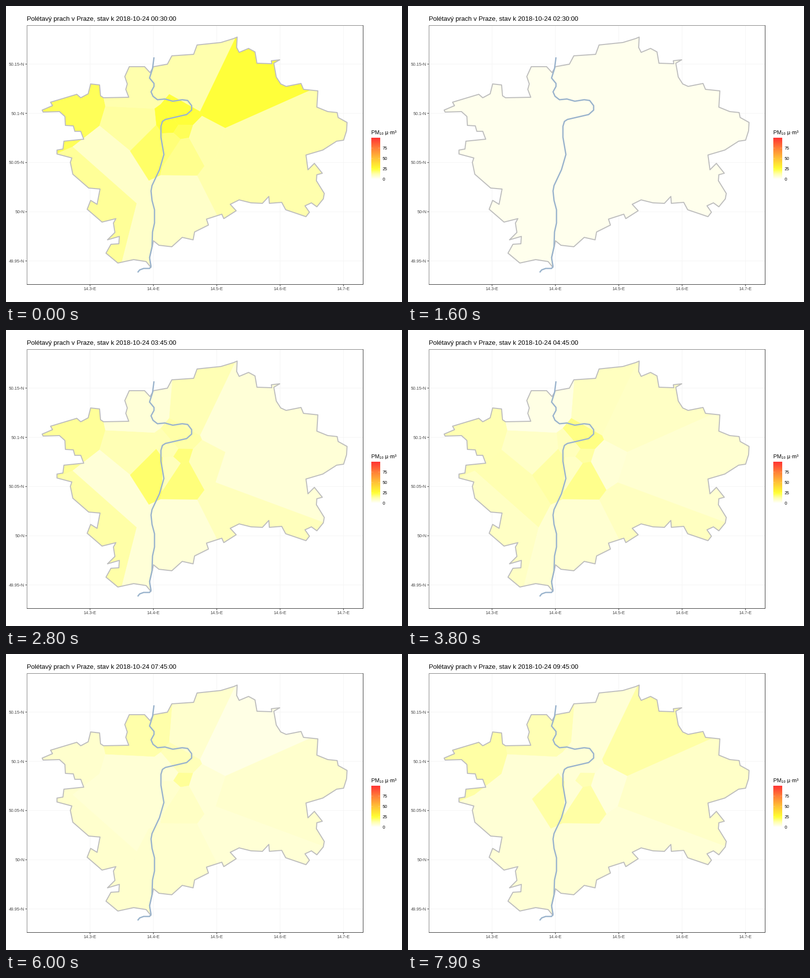
Animation, 800 px wide and 600 px high, one loop 8000 ms. Source, as a matplotlib script:

```python
import numpy as np
import matplotlib.pyplot as plt
from matplotlib.animation import FuncAnimation
from matplotlib.colors import LinearSegmentedColormap
from matplotlib.patches import Polygon

W, H, DPI = 800, 600, 100
PX = 72 / DPI
STEP = 4          # animation frames per reading
N_FRAMES = 80
LEFT, TOP, RIGHT, BOTTOM = 42.5, 39.5, 721.5, 564.5

plt.rcParams["font.family"] = ["Liberation Sans", "DejaVu Sans"]

# City limits, clockwise from the northern tip, in stage pixels
EAST = [
    (467, 63), (466, 84), (471, 94), (490, 86), (503, 93), (507, 116), (537, 117),
    (536, 111), (553, 109), (541, 116), (546, 144), (555, 158), (566, 163),
    (596, 157), (601, 169), (630, 172), (628, 205), (650, 214), (669, 216),
    (671, 226), (689, 236), (688, 253), (682, 272), (668, 274), (640, 292),
    (606, 302), (610, 332), (623, 319), (639, 339), (628, 342), (627, 354),
    (643, 380), (641, 391), (628, 407), (617, 399), (604, 405), (613, 418),
    (606, 427), (565, 413), (557, 398), (532, 400), (531, 386), (518, 400),
    (495, 399), (471, 393), (453, 402), (465, 415), (440, 431), (436, 422),
]
WEST = [
    (405, 432), (409, 444), (381, 458), (378, 474), (356, 469), (335, 488),
    (309, 485), (298, 476), (290, 512), (293, 530), (283, 518), (258, 514),
    (226, 521), (202, 501), (212, 483), (228, 482), (229, 467), (205, 474),
    (220, 459), (217, 440), (222, 431), (194, 438), (164, 412), (171, 394),
    (184, 402), (190, 371), (167, 369), (135, 341), (130, 317), (133, 308),
    (103, 300), (103, 292), (115, 290), (117, 274), (157, 270), (151, 254),
    (139, 254), (136, 243), (120, 242), (119, 224), (108, 214), (75, 215),
    (73, 211), (94, 202), (90, 195), (143, 179), (151, 186), (166, 178),
    (171, 158), (189, 160), (191, 182), (197, 186), (248, 185), (242, 169),
    (245, 158), (240, 143), (249, 123), (280, 123), (291, 135), (298, 123),
    (326, 118), (335, 101), (379, 98), (386, 79), (434, 74), (460, 66),
]
RIVER = [
    (299, 104), (296, 127), (290, 146), (299, 157), (299, 163), (293, 174),
    (297, 183), (306, 190), (321, 188.5), (337, 193), (356, 190), (367, 191.5),
    (375, 202), (375, 211), (365, 220), (322, 230), (316, 234), (313, 244),
    (313, 266), (319, 301), (310, 332), (295, 364), (293, 375), (295, 394),
    (300, 413), (300, 440), (296, 458), (295, 488), (290, 510), (293, 528),
    (290, 532), (278, 532), (270, 535), (266, 540),
]
STATIONS = dict(
    W=(115, 201.6), P=(273.6, 249), B=(211.2, 324.8), C=(182.6, 357),
    D=(356.5, 401), A=(295.8, 271.2), E=(277.8, 164.4), F=(383.6, 173),
    G=(429.5, 195), H=(473.1, 292.7), I=(450.3, 354), J=(352.5, 228),
    K=(335, 243), L=(352.2, 254), M=(357.5, 285.3), N=(336.5, 271.5),
    O=(392, 266.5),
)


def voronoi_cell(name):
    """Part of the stage that lies nearer to this station than to any other."""
    site = np.array(STATIONS[name])
    cell = [np.array(p, float) for p in ((0, 0), (W, 0), (W, H), (0, H))]
    for other in STATIONS:
        if other == name:
            continue
        rival = np.array(STATIONS[other])
        side = [(p - (site + rival) / 2) @ (rival - site) for p in cell]
        kept = []
        for i, p in enumerate(cell):
            q, sp, sq = cell[i - 1], side[i], side[i - 1]
            if sp * sq < 0:
                kept.append(q + (p - q) * sq / (sq - sp))
            if sp <= 0:
                kept.append(p)
        cell = kept
    return cell


def reading(rest, **_groups):
    """Blue channel per station: one common level, then groups that differ."""
    levels = dict.fromkeys(STATIONS, rest)
    for names, level in _groups.items():
        levels.update(dict.fromkeys(names, level))
    return np.array(list(levels.values()), float)


night = reading(173, GJK=58, WL=88, A=103, N=120, M=142, C=152, P=161, BD=201)
late = reading(195, A=57, JKL=96, W=119, MN=152, CI=161, HO=181, D=206, BG=221)
calm = reading(237)
small_hours = reading(215, A=108, LM=123, W=152, CJ=167, PFK=181, ION=188)
dawn = reading(204, J=140, BLM=176, PCA=215, E=222, O=233)
morning = reading(205, L=152, E=170, J=184, M=196, PBAIKO=213, G=229)
day = reading(213, WAGM=165, EL=180, H=200, O=219)
before_dawn = np.clip(2 * dawn - morning, 60, 240)

# Reading index -> levels; the rest is interpolated
KEYS = {0: night, 2: late, 3: late, 4: calm, 7: small_hours, 11: before_dawn,
        12: 2 * dawn - before_dawn, 13: morning, 15: morning, 18: day, 20: day}
KEY_LEVELS = np.array(list(KEYS.values())).T

fig = plt.figure(figsize=(W / DPI, H / DPI), dpi=DPI, facecolor="white")
ax = fig.add_axes([0, 0, 1, 1])
ax.set_axis_off()


def line(xs, ys, color, width, z=1, **kw):
    ax.plot(xs, ys, color=color, lw=width * PX, zorder=z, snap=False, **kw)


def label(x, y, s, size, color="black", **kw):
    return ax.text(x, y, s, fontsize=size * PX, color=color, **kw)


# Panel, grid and axes
for n in range(5):
    x = 169.8 + 128 * n
    y = 117.8 + 99.75 * n
    line([x, x], [TOP, BOTTOM], "#f5f5f5", 1, 0)
    line([LEFT, RIGHT], [y, y], "#f5f5f5", 1, 0)
    line([x, x], [BOTTOM, BOTTOM + 3], "#333333", 1)
    line([LEFT - 3, LEFT], [y, y], "#333333", 1)
    label(x, 576, f"{14.3 + n / 10:.1f}\u25e6E", 8.8, "#4d4d4d", ha="center")
    label(37.5, y + 3, f"{50.15 - n * .05:.4g}\u25e6N", 8.8, "#4d4d4d", ha="right")
line([LEFT, LEFT, RIGHT], [BOTTOM, TOP, TOP], "#808080", 1, 6)
line([LEFT, RIGHT, RIGHT], [BOTTOM, BOTTOM, TOP], "#333333", 1, 6)

# Map
outline = Polygon(EAST + WEST, closed=True, fc="none", ec="#bebebe", lw=2.1 * PX,
                  joinstyle="round", zorder=4)
ax.add_patch(outline)
cells = []
for name in STATIONS:
    cell = Polygon(voronoi_cell(name), closed=True, lw=.4, zorder=2)
    ax.add_patch(cell)
    cell.set_clip_path(outline)
    cells.append(cell)
line(*zip(*RIVER), "#9bb4cd", 2.7, 5, solid_joinstyle="round", solid_capstyle="butt")

# Legend
scale = LinearSegmentedColormap.from_list("dust", [
    (0, "#ffffff"), (.125, "#ffffab"), (.25, "#ffff33"), (.5, "#ffc236"),
    (.75, "#ff8038"), (1, "#ff3333")])
ax.imshow(np.linspace(1, 0, 256)[:, None], cmap=scale, aspect="auto",
          extent=(738, 755.5, 351, 267), interpolation="bilinear")
label(738, 260, "PM\u2081\u2080 \u00b5\u00b7m\u00b3", 11)
for value in (0, 25, 50, 75):
    y = 351 - .84 * value
    for x in (738, 752):
        line([x, x + 3.5], [y, y], "white", .5, 3, alpha=.5)
    label(761, y + 3, str(value), 8.8)

title = label(42, 30, "", 13.13)

ax.set_xlim(0, W)
ax.set_ylim(H, 0)


def draw(frame):
    k, phase = divmod(frame, STEP)
    # hold each reading, with one halfway frame before the next
    pos = k + (.5 if phase == STEP - 1 else 0)
    for cell, levels in zip(cells, KEY_LEVELS):
        cell.set_color((1, 1, np.interp(pos, list(KEYS), levels) / 255))
    minutes = 30 + 30 * k - (15 if k > 5 else 0)
    clock = f"{minutes // 60:02d}:{minutes % 60:02d}:00"
    title.set_text(f"Polétavý prach v Praze, stav k 2018-10-24 {clock}")
    return cells + [title]


anim = FuncAnimation(fig, draw, frames=N_FRAMES, interval=100,
                     repeat=True, repeat_delay=0, blit=False)
plt.show()
```
